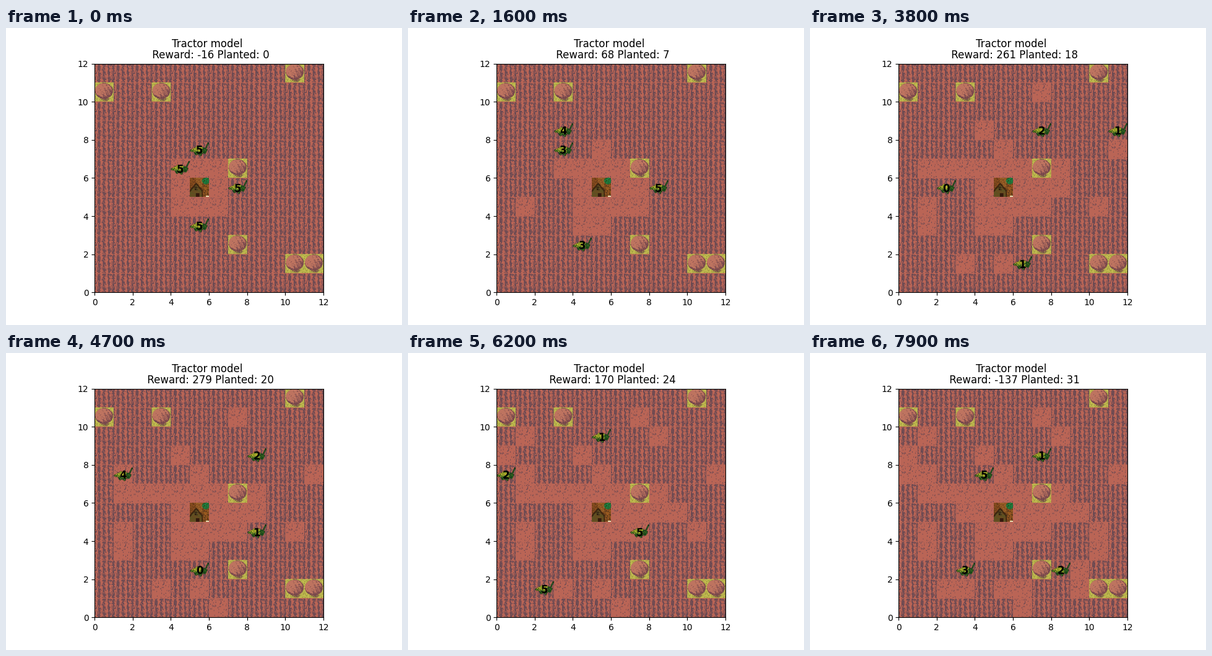
These frames come from a looping animation (640x480 px, 8 s). A matplotlib script:

```python
import numpy as np
import matplotlib.pyplot as plt
from matplotlib.animation import FuncAnimation
from matplotlib.colors import to_rgb

FRAMES, SIZE, N = 80, 12, 32
TREES = [(0, 10), (3, 10), (10, 11), (7, 6), (7, 2), (10, 1), (11, 1)]
HOME = (5, 5)
CAPACITY, BONUS = 5, 50

# Ends of the work shifts and the reward reached by then.
SHIFTS = [0, 7, 25, 38, 47, 62, 79]
REWARDS = [-16, 229, 107, 261, 279, 170, -137]

# Per tractor: start, then the stops of each shift. Every stop but the last
# gets planted; HOME means refuelling beside the house.
ROUTES = [
    ((5, 7), [[(5, 7), (5, 7)], [(4, 8), (4, 9)], [(7, 10), (7, 8)],
              [(8, 8)], [(8, 9), (5, 9)], [(7, 8)]]),
    ((4, 6), [[(1, 4), (2, 4)], [(3, 6), (1, 6), (1, 5)], [(1, 3), (2, 6), (2, 5)],
              [HOME, (1, 7), (1, 7)], [(1, 9), (0, 8), (0, 7)],
              [(0, 7), (3, 5), HOME, (4, 7)]]),
    ((7, 5), [[(7, 5), (7, 4), (7, 4)], [HOME, (8, 6), (10, 4), (9, 5)],
              [(8, 5), (11, 7), (11, 8)], [(8, 4)], [(9, 5), HOME, (7, 4)],
              [(10, 3), (9, 2), (9, 1), (8, 2)]]),
    ((5, 3), [[(5, 3), (4, 3), (4, 3)], [(5, 1), (5, 0)], [(3, 1), (6, 1)],
              [(6, 0), (5, 2)], [HOME, (2, 1)], [(2, 1), (6, 1), (3, 2)]]),
]

rng = np.random.default_rng(4)


def distance(a, b):
    return abs(a[0] - b[0]) + abs(a[1] - b[1])


def neighbours(cell):
    """Cells next to this one, in random order, free ones first."""
    x, y = cell
    near = [(x + 1, y), (x - 1, y), (x, y + 1), (x, y - 1)]
    near = [c for c in near if min(c) >= 0 and max(c) < SIZE]
    rng.shuffle(near)
    near = [tuple(map(int, c)) for c in near]
    return sorted(near, key=lambda c: c in TREES or c == HOME)


def work_shift(start, stops, length):
    """Steps (cell, action) through the stops, padded with short detours."""
    cell, steps = start, []
    for i, stop in enumerate(stops):
        while distance(cell, stop) > (stop == HOME):
            cell = next(c for c in neighbours(cell)
                        if distance(c, stop) < distance(cell, stop))
            steps.append((cell, ""))
        if stop == HOME:
            steps[-1] = (cell, "fuel")
        elif i < len(stops) - 1:
            steps.append((cell, "plant"))
    while len(steps) < length:
        at = int(rng.integers(len(steps) + 1))
        here = steps[at - 1][0] if at else start
        detour = [(neighbours(here)[0], ""), (here, "")]
        steps[at:at] = detour[len(steps) - length:]
    return steps


def plan_route(start, shifts):
    steps = [(start, "")]
    for stops, length in zip(shifts, np.diff(SHIFTS)):
        steps += work_shift(steps[-1][0], stops, length)
    return steps


def simulate():
    """Cells, loads and planted cells at every step."""
    loads, planted, history = [CAPACITY] * len(ROUTES), [], []
    for moment in zip(*(plan_route(*route) for route in ROUTES)):
        for k, (cell, action) in enumerate(moment):
            if action == "plant":
                planted.append(cell)
                loads[k] -= 1
            elif action == "fuel":
                loads[k] = CAPACITY
        history.append(([cell for cell, _ in moment], list(loads), list(planted)))
    return history


V, U = (np.mgrid[0:N, 0:N] + 0.5) / N
EVERYWHERE = U > 0
SALMON, SLATE = "#ba6556", "#6c4a52"


def blank(channels=3):
    return np.zeros((N, N, channels))


def paint(img, mask, light, dark=None, share=0.3):
    """Fill a mask with a light colour, speckled with a share of a dark one."""
    speck = (rng.random((N, N)) < share)[..., None]
    mix = np.where(speck, to_rgb(dark or light), to_rgb(light))
    img[mask, :3] = mix[mask]
    img[mask, 3:] = 1


def ellipse(cx, cy, rx, ry):
    return ((U - cx) / rx) ** 2 + ((V - cy) / ry) ** 2 < 1


def box(left, right, top, bottom):
    return (U > left) & (U < right) & (V > top) & (V < bottom)


def field_tile():
    img = blank()
    paint(img, EVERYWHERE, SALMON)
    dashes = rng.random((N // 2, N)).repeat(2, axis=0)
    furrow = 0.52 + 0.42 * np.cos(8 * np.pi * U)
    paint(img, dashes < furrow, SLATE, "#8a5655", 0.15)
    paint(img, V < 1 / N, SALMON)
    return img


def soil_tile():
    img = blank()
    paint(img, EVERYWHERE, SALMON)
    seeds = rng.random((N, N)) < 0.055
    paint(img, seeds | np.roll(seeds, 1, axis=0), SLATE, "#925654")
    paint(img, V < 1 / N, SALMON)
    return img


def tree_tile():
    img = blank()
    paint(img, EVERYWHERE, "#c2bc50", "#a09a40")
    paint(img, ellipse(0.55, 0.87, 0.22, 0.1), "#7c5a4a", "#a09a40")
    paint(img, ellipse(0.5, 0.45, 0.47, 0.42), "#74464c", "#9a5a50")
    leaves = 0.15 + 0.9 * (U + V - 0.9) + 0.25 * np.sin(25 * (U - 0.6 * V))
    paint(img, ellipse(0.47, 0.41, 0.43, 0.36), "#be7460", "#7e4c4e", leaves)
    return img


def house_tile():
    img = blank()
    paint(img, EVERYWHERE, "#8a4e1e", "#5a3418")
    paint(img, box(0.3, 0.68, 0, 0.5), "#9c6228", "#7a461c")
    paint(img, box(0.66, 1, 0.3, 1), "#9a5a20", "#54341a", 0.4)
    paint(img, ellipse(0.84, 0.16, 0.2, 0.18), "#1c8040", "#284c20")
    gable = V - 0.32 - 1.2 * np.abs(U - 0.33)
    paint(img, (gable > -0.08) & (U < 0.68), "#3e2610")
    paint(img, (gable > 0.05) & (U < 0.62), "#5c5222", "#6a4a20", 0.4)
    paint(img, box(0.25, 0.42, 0.48, 0.65), "#302212", "#82783c", 0.2)
    paint(img, box(0.3, 0.5, 0.8, 1), "#341a0e")
    paint(img, box(0.84, 1, 0.94, 1), "#e6deb4")
    return img


def tractor_sprite():
    img = blank(4)
    bulge = np.sin(np.pi * U)
    body = (V > 0.54 - 0.2 * bulge) & (V < 0.52 + 0.28 * bulge + 0.05 * np.sin(25 * U))
    tail = box(0.78, 1, 0.13, 0.6) & (np.abs(V - 0.5 + 2 * (U - 0.8)) < 0.1)
    paint(img, tail, "#2c5226", "#1a3418")
    paint(img, body, "#143c18", "#2e6822", 0.35)
    glow = np.exp(-12 * ((U - 0.4) ** 2 + 2 * (V - 0.44) ** 2))
    paint(img, (body | ellipse(0.45, 0.4, 0.17, 0.1)) & (rng.random((N, N)) < glow),
          "#c8b82c", "#5a7c24", 0.4)
    return img


def put(land, tile, cell):
    x, y = cell
    top = (SIZE - 1 - y) * N
    land[top:top + N, x * N:(x + 1) * N] = tile


history = simulate()
soil, tree, sprite = soil_tile(), tree_tile(), tractor_sprite()
base = np.tile(field_tile(), (SIZE, SIZE, 1))
for dx in (-1, 0, 1):
    for dy in (-1, 0, 1):
        put(base, soil, (HOME[0] + dx, HOME[1] + dy))
for spot in TREES:
    put(base, tree, spot)
put(base, house_tile(), HOME)

# Planting pays a bonus; the rest of the reward drifts along each shift.
drift = [reward - BONUS * len(history[step][2]) for step, reward in zip(SHIFTS, REWARDS)]

fig, ax = plt.subplots(figsize=(6.4, 4.8), dpi=100)
ground = ax.imshow(base, extent=(0, SIZE, 0, SIZE))
tractors = [ax.imshow(sprite, extent=(0, 1, 0, 1), zorder=2) for _ in ROUTES]
labels = [ax.text(0, 0, "", weight="bold", size=12, ha="center",
                  va="center_baseline", zorder=3) for _ in ROUTES]
ax.set(xlim=(0, SIZE), ylim=(0, SIZE))


def update(step):
    cells, loads, planted = history[step]
    land = base.copy()
    for cell in planted:
        put(land, soil, cell)
    ground.set_data(land)
    for image, label, (x, y), load in zip(tractors, labels, cells, loads):
        image.set_extent((x, x + 1, y, y + 1))
        label.set_position((x + 0.5, y + 0.5))
        label.set_text(str(load))
    count = len(planted)
    reward = round(np.interp(step, SHIFTS, drift) + BONUS * count)
    ax.set_title(f"Tractor model \n Reward: {reward} Planted: {count}", linespacing=1)
    return [ground, *tractors, *labels]


anim = FuncAnimation(fig, update, frames=FRAMES, interval=100, repeat=True,
                     repeat_delay=0, blit=False)
plt.show()
```
